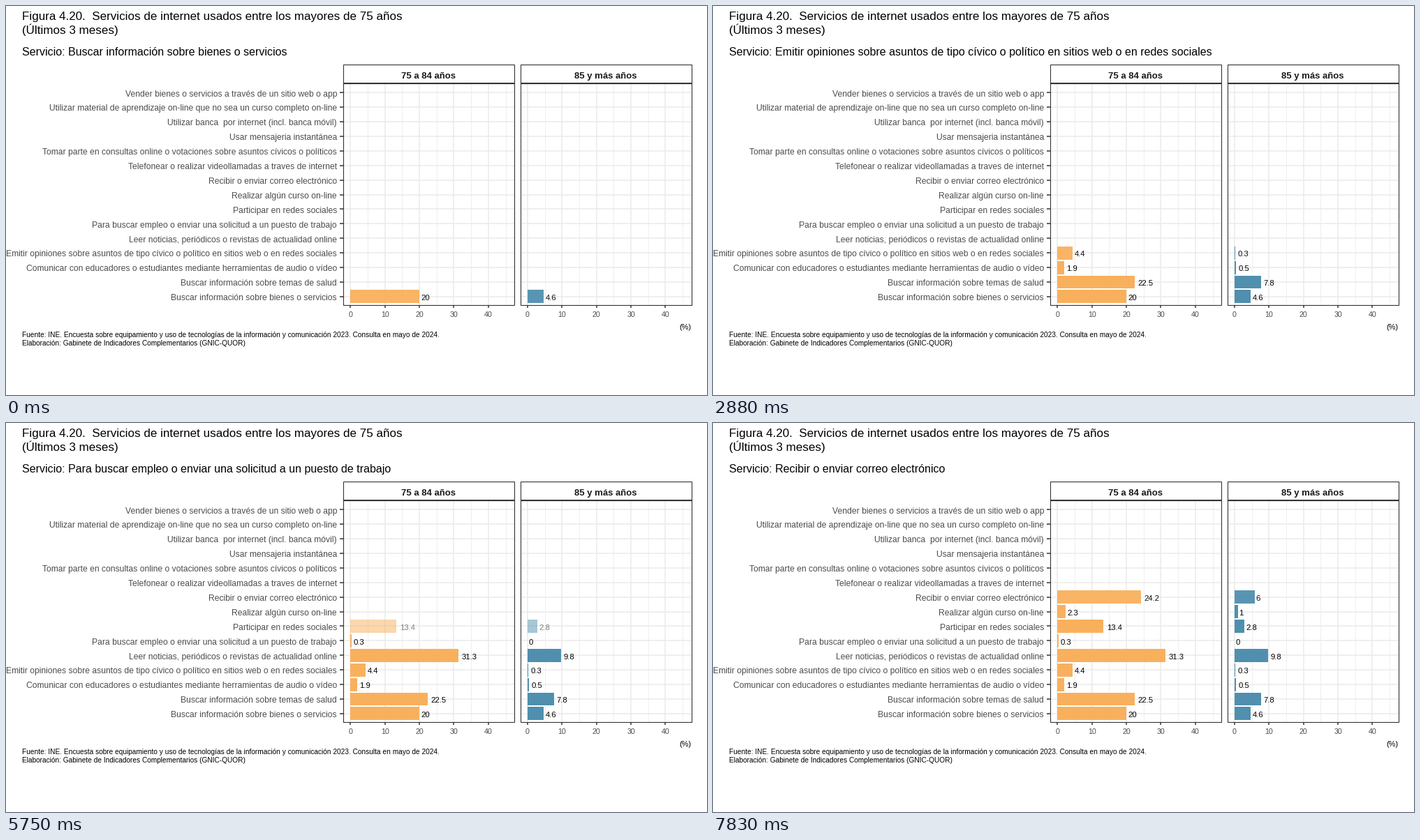
Recreate the animation shown at these times as a matplotlib script. Size 1004 by 558 pixels, loop 8 s.

```python
import matplotlib.pyplot as plt
from matplotlib.animation import FuncAnimation
from matplotlib.patches import Rectangle

W, H, DPI = 1004, 558, 100
LOOP, INTERVAL = 8000, 40
PX = 72 / DPI                      # points per pixel

ORANGE, BLUE = "#f9b05d", "#508fae"
GRID, DARK, LABEL = "#ebebeb", "#333333", "#4d4d4d"

SERVICES = [
    "Buscar información sobre bienes o servicios",
    "Buscar información sobre temas de salud",
    "Comunicar con educadores o estudiantes mediante herramientas de audio o vídeo",
    "Emitir opiniones sobre asuntos de tipo cívico o político en sitios web o en redes sociales",
    "Leer noticias, periódicos o revistas de actualidad online",
    "Para buscar empleo o enviar una solicitud a un puesto de trabajo",
    "Participar en redes sociales",
    "Realizar algún curso on-line",
    "Recibir o enviar correo electrónico",
    "Telefonear o realizar videollamadas a traves de internet",
    "Tomar parte en consultas online o votaciones sobre asuntos cívicos o políticos",
    "Usar mensajeria instantánea",
    "Utilizar banca  por internet (incl. banca móvil)",
    "Utilizar material de aprendizaje on-line que no sea un curso completo on-line",
    "Vender bienes o servicios a través de un sitio web o app",
]
YOUNGER = [20, 22.5, 1.9, 4.4, 31.3, 0.3, 13.4, 2.3, 24.2]
OLDER = [4.6, 7.8, 0.5, 0.3, 9.8, 0, 2.8, 1, 6]

# Panel geometry in pixels
STEP, FIRST_ROW, UNIT = 20.9, 416.9, 4.94
STRIP_TOP, TOP, BOTTOM = 84.5, 111.5, 429.5
PANELS = [
    ("75 a 84 años", 482.5, 493.2, YOUNGER, ORANGE),
    ("85 y más años", 736.5, 746.8, OLDER, BLUE),
]
PANEL_WIDTH = 245
BASELINE = 5.2                     # from a row's centre to its text baseline
VALUE_SIZE = 11.2

# Start of each transition and its steps after that start
STARTS = [540 + 1000 * i for i in range(7)] + [7500]
STEPS = [130, 170, 210, 250, 290]
FADE_STEPS = 6
NEARLY_FULL = 0.95

plt.rcParams["font.family"] = "Liberation Sans"
# The small surplus keeps the width from being truncated to one pixel less
fig = plt.figure(figsize=((W + 0.01) / DPI, (H + 0.01) / DPI), dpi=DPI,
                 facecolor="white")
ax = fig.add_axes([0, 0, 1, 1])
ax.set(xlim=(0, W), ylim=(H, 0))
ax.axis("off")


def write(x, y, text, size, color="black", ha="left", **style):
    return ax.text(x, y, text, fontsize=size * PX, color=color, ha=ha,
                   va="baseline", **style)


def row_y(i):
    return FIRST_ROW - STEP * i


def hlines(ys, x0, x1, color, width, z):
    ax.hlines(ys, x0, x1, colors=color, linewidths=width * PX, zorder=z)


def vlines(xs, y0, y1, color, width, z):
    ax.vlines(xs, y0, y1, colors=color, linewidths=width * PX, zorder=z)


def value_width(text):
    return VALUE_SIZE * sum(0.278 if c == "." else 0.556 for c in text)


def draw_panel(title, left, zero, values, color):
    """Draw one facet and return its (bar, value label) pairs."""
    right = left + PANEL_WIDTH
    rows = [row_y(i) for i in range(len(SERVICES))]
    majors = [zero + UNIT * v for v in range(0, 50, 10)]
    minors = [zero + UNIT * v for v in range(5, 50, 10)]

    vlines(minors, TOP, BOTTOM, GRID, 0.8, 1)
    vlines(majors, TOP, BOTTOM, GRID, 1.5, 1)
    hlines(rows, left, right, GRID, 1.5, 1)

    for y0, y1 in ((STRIP_TOP, TOP), (TOP, BOTTOM)):
        ax.add_patch(Rectangle((left, y0), PANEL_WIDTH, y1 - y0, fill=False,
                               edgecolor=DARK, linewidth=1.1 * PX, zorder=4))
    hlines([TOP - 0.5], left, right, DARK, 2, 4)
    write((left + right) / 2, 103.5, title, 13.1, "#1a1a1a", "center",
          weight="bold")

    vlines(majors, BOTTOM, BOTTOM + 4, DARK, 1.5, 4)
    for i, x in enumerate(majors):
        write(x, 446, str(10 * i), 10.6, LABEL, "center")

    pairs = []
    for i, value in enumerate(values):
        y, text = row_y(i), str(value)
        bar = ax.add_patch(Rectangle((zero, y - 0.45 * STEP), UNIT * value,
                                     0.9 * STEP, facecolor=color,
                                     linewidth=0, zorder=2))
        x = zero + UNIT * value + 0.2 * value_width(text)
        pairs.append((bar, write(x, y + BASELINE, text, VALUE_SIZE, zorder=5)))
    return pairs


write(22.5, 20, "Figura 4.20.  Servicios de internet usados entre los mayores de 75 años", 17.05)
write(22.5, 40, "(Últimos 3 meses)", 17.05)
subtitle = write(22.5, 71, "", 16)

for i, name in enumerate(SERVICES):
    write(474, row_y(i) + BASELINE, name, 12.1, LABEL, "right")
hlines([row_y(i) for i in range(len(SERVICES))], 478, 482.5, DARK, 1.5, 4)

pairs_by_row = list(zip(*(draw_panel(*panel) for panel in PANELS)))

write(981, 464, "(%)", 11, ha="right")
write(22.5, 475, "Fuente: INE. Encuesta sobre equipamiento y uso de tecnologías de la "
      "información y comunicación 2023. Consulta en mayo de 2024.", 10.17)
write(22.5, 487, "Elaboración: Gabinete de Indicadores Complementarios (GNIC-QUOR)", 10.17)


def fade_step(t, start):
    """Number of fade steps (0 to 6) done by time t."""
    end = 340 if start < 7500 else 330
    return sum(t >= start + s for s in STEPS + [end])


def row_alpha(t, i):
    """Fade in by steps; the last trace clears when the next change begins."""
    if i < len(STARTS) and t >= STARTS[i]:
        return 1
    step = FADE_STEPS if i == 0 else fade_step(t, STARTS[i - 1])
    return min(step / FADE_STEPS, NEARLY_FULL)


def update(frame):
    t = frame * INTERVAL + 30
    current = sum(fade_step(t, s) > FADE_STEPS / 2 for s in STARTS)
    subtitle.set_text("Servicio: " + SERVICES[current])
    changed = [subtitle]
    for i, pairs in enumerate(pairs_by_row):
        alpha = row_alpha(t, i)
        for artist in (a for pair in pairs for a in pair):
            artist.set_alpha(alpha)
            artist.set_visible(alpha > 0)
            changed.append(artist)
    return changed


anim = FuncAnimation(fig, update, frames=LOOP // INTERVAL, interval=INTERVAL,
                     repeat=True, repeat_delay=0)
plt.show()
```
